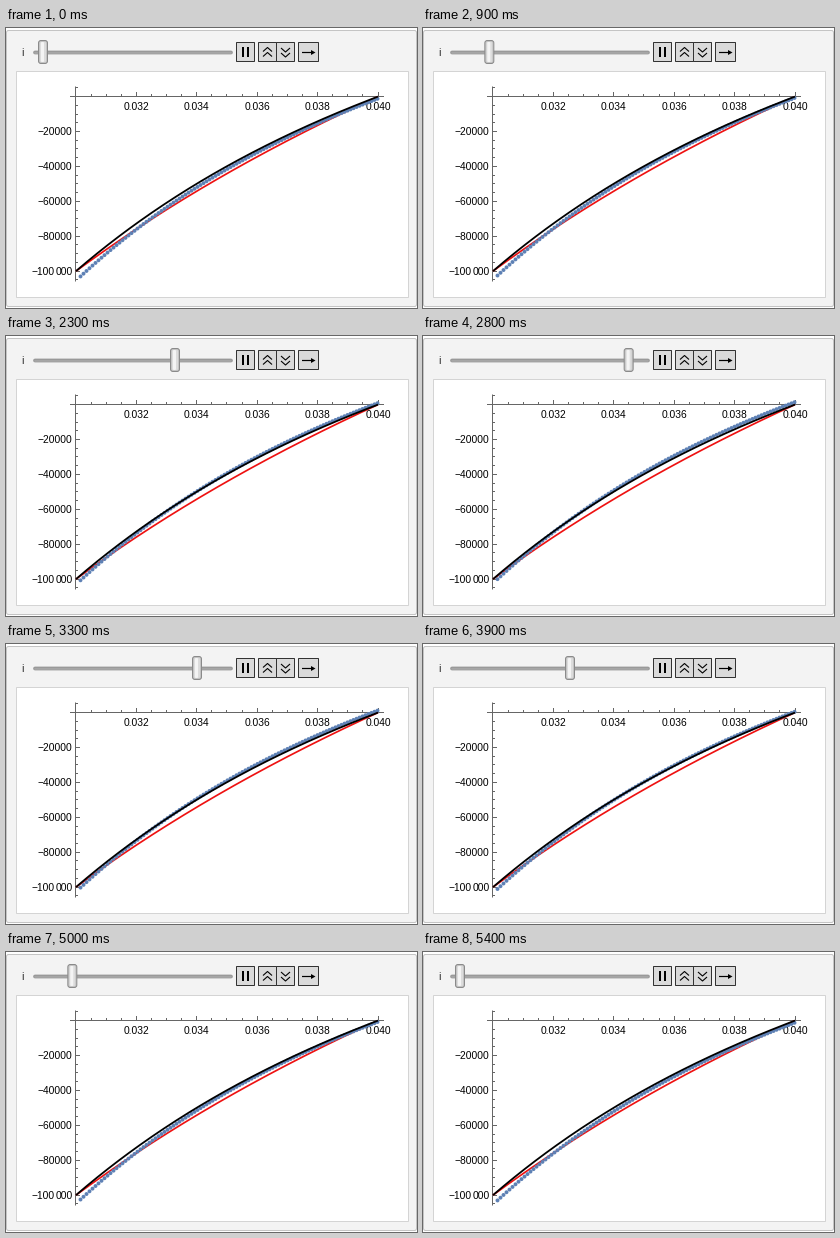
These frames come from a looping animation (411 by 280 pixels, 6000 ms). A matplotlib script:

```python
import numpy as np
import matplotlib.pyplot as plt
from matplotlib.animation import FuncAnimation
from matplotlib.patches import FancyBboxPatch, Rectangle

W, H, DPI = 411, 280, 100
PX = 72 / DPI
STEPS, FRAMES, TICK = 24, 60, 100

# Coordinates below already sit on pixel centres
plt.rcParams["path.snap"] = False

fig = plt.figure(figsize=(W / DPI, H / DPI), dpi=DPI, facecolor="white")
ax = fig.add_axes([0, 0, 1, 1])
ax.set_xlim(0, W)
ax.set_ylim(H, 0)
ax.axis("off")


def box(x, y, w, h, face, edge, radius=0, lw=1, z=1):
    if radius:
        patch = FancyBboxPatch((x, y), w, h, mutation_aspect=1,
                               boxstyle=f"round,pad=0,rounding_size={radius}")
    else:
        patch = Rectangle((x, y), w, h)
    patch.set(facecolor=face, edgecolor=edge, linewidth=lw * PX, zorder=z)
    return ax.add_patch(patch)


def line(xs, ys, color, lw=1.0, z=2, cap="butt"):
    ax.plot(xs, ys, color=color, lw=lw * PX, zorder=z, solid_capstyle=cap)


def label(x, y, text, ha="center", size=10.3, color="black"):
    ax.text(x, y, text, ha=ha, va="center_baseline", color=color,
            fontsize=size * PX, family="Liberation Sans", zorder=3)


def to_x(r):
    return 70 + (r - 0.03) * 30200


def to_y(v):
    return 68.6 - v * 0.001745


def power_curve(r, n):
    """Power law in 1/r running from -100000 at 0.03 to 0 at 0.04."""
    return 1e5 * (1 - (0.04 / r) ** n) / ((4 / 3) ** n - 1)


# Panels
box(0.5, 2.5, 410, 276, "#f3f3f3", "#c4c4c4", radius=2)
box(10.5, 43.5, 392, 226, "white", "#d4d4d4")

# Slider track
label(16.5, 23.5, "i", size=11, color="#333333")
line([29, 225], [24.5, 24.5], "#999999", 3.8, cap="round")
line([29, 225], [24.9, 24.9], "#a8a8a8", 1.6, cap="round")

# Buttons
for left, width in ((230.5, 18), (252.5, 18), (270.5, 18), (292.5, 20)):
    box(left, 14.5, width, 19, "#dadada", "#333333")
for x in (237, 242):
    line([x, x], [19, 29], "black", 2)
for y in (23.5, 28.5):
    line([257, 261.5, 266], [y, y - 4, y], "black", 1.1)
for y in (20, 25):
    line([275, 279.5, 284], [y, y + 4, y], "black", 1.1)
line([296, 307], [24.5, 24.5], "black", 1.2)
ax.fill([305, 309.5, 305], [22, 24.5, 27], color="black", lw=0, zorder=3)

# Plot axes
GREY = "#666666"
line([64, 378], [68.5, 68.5], GREY)
line([69.5, 69.5], [58.5, 253.5], GREY)
for k in range(1, 21):
    x = np.floor(to_x(0.03 + k * 0.0005)) + 0.5
    major = k % 4 == 0
    line([x, x], [68.5, 64 if major else 66], GREY)
    if major:
        label(x, 77.5, f"{0.03 + k * 0.0005:.3f}")
for k in range(-21, 2):
    y = np.floor(to_y(k * 5000)) + 0.5
    major = k % 4 == 0
    line([69.5, 74 if major else 72], [y, y], GREY)
    if major and -20 < k < 0:
        label(66.5, y - 0.8, f"\u2212{-k * 5000}", ha="right")
    elif k == -20:
        label(66.5, y - 0.8, "000", ha="right")
        label(48.6, y - 0.8, "\u2212100", ha="right")

# Fixed curves, with the dots between them
UPPER, LOWER = 1.85, 0.65
r = np.linspace(0.03, 0.04, 200)
line(to_x(r), to_y(power_curve(r, LOWER)), "#ee1111", 1.7, z=4)
line(to_x(r), to_y(power_curve(r, UPPER)), "black", 1.8, z=6)

DOTS = 100
dot_x = np.linspace(74.5, 371.5, DOTS)
dot_r = 0.03 + (dot_x - 70) / 30200
u = np.linspace(0, 1, DOTS)
dot_base = to_y(power_curve(dot_r, UPPER)) + 2 + 7.2 * (1 - u) ** 3
dot_lift = 0.23 - 0.03 * u
# One colour per dot keeps matplotlib from rounding their positions
dots = ax.scatter(dot_x, dot_base, s=(3.9 * PX) ** 2, linewidths=0,
                  c=["#5e81b5"] * DOTS, zorder=5)

# Slider thumb: outline plus shaded strips, each with its offset
thumb = [(box(0, 12.5, 9, 23, "#c4c4c4", "#8a8a8a", radius=2.5, z=7), -4.5)]
for dx, w, shade in ((-3, 6, "#dcdcdc"), (-2, 3, "#f4f4f4")):
    thumb.append((box(0, 14, w, 20, shade, "none", radius=1, z=8), dx))


def step_at(frame):
    """Hold, climb one step per tick, pause one tick, then come back."""
    if frame < 30:
        return int(np.clip(frame - 5, 0, STEPS))
    return int(np.clip(54 - frame, 0, STEPS))


def draw(frame):
    step = step_at(frame)
    center = 37 + step * 22 / 3
    for patch, dx in thumb:
        patch.set_x(center + dx)
    dots.set_offsets(np.column_stack([dot_x, dot_base - step * dot_lift]))
    return [dots] + [patch for patch, _ in thumb]


anim = FuncAnimation(fig, draw, frames=FRAMES, interval=TICK,
                     repeat=True, repeat_delay=0, blit=False)
plt.show()
```
